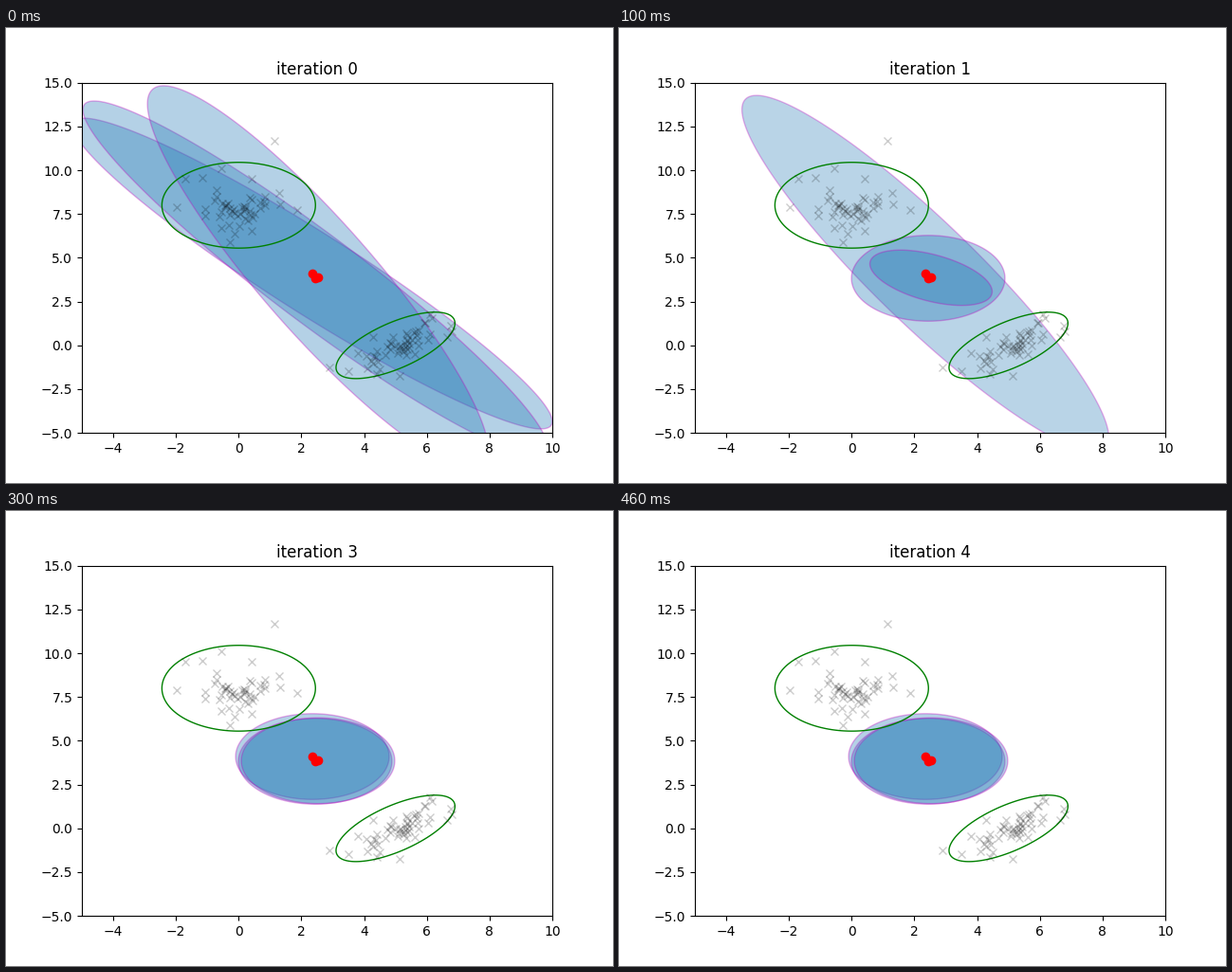
These frames come from a looping animation (640x480 px, 500 ms). A matplotlib script:

```python
import numpy as np
import matplotlib.pyplot as plt
from matplotlib.animation import FuncAnimation
from matplotlib.patches import Polygon

plt.rcParams["text.kerning_factor"] = 6  # whole-pixel kerning

K95 = np.sqrt(5.991)  # radius of the 95% contour
MEANS = [(2.35, 4.10), (2.44, 3.83), (2.53, 3.86)]
UNIT = (K95, K95, 0)

# Half width, half height and correlation of each component
SHAPES = [
    [(7.65, 8.87, -0.952), (7.41, 10.12, -0.951), (5.44, 10.96, -0.905)],
    [(5.85, 10.17, -0.92), UNIT, (1.95, 1.58, -0.5)],
    [UNIT] * 3,
]
LEAD_WEIGHTS = [1 / 3, 0.31, 1 / 3]

rng = np.random.default_rng(7)


def cluster(mean, sd, rho, n, strays):
    """Correlated normal core plus a few marks that stand apart."""
    sx, sy = sd
    cov = [[sx * sx, rho * sx * sy], [rho * sx * sy, sy * sy]]
    return np.vstack([rng.multivariate_normal(mean, cov, n), strays])


def contour(mean, shape):
    t = np.linspace(0, 2 * np.pi, 240, endpoint=False)
    w, h, rho = shape
    x = mean[0] + w * np.cos(t)
    y = mean[1] + h * (rho * np.cos(t) + np.sqrt(1 - rho ** 2) * np.sin(t))
    return np.column_stack([x, y])


fig, ax = plt.subplots(figsize=(6.4, 4.8), dpi=100)
ax.set_xlim(-5, 10)
ax.set_ylim(-5, 15)
title = ax.set_title("iteration 0")

upper = cluster((-0.15, 7.7), (0.65, 0.65), 0.1, 44,
                [(1.14, 11.68), (1.87, 7.73), (-1.7, 9.52), (-1.15, 9.57),
                 (-0.55, 10.1), (0.42, 9.52), (-1.97, 7.89), (-0.27, 5.89)])
lower = cluster((5.0, -0.05), (0.7, 0.7), 0.7, 48,
                [(2.9, -1.25), (3.5, -1.48), (6.1, 1.77), (6.75, 1.13),
                 (6.78, 0.8), (5.13, -1.75), (4.4, -1.64)])
ax.plot(*np.vstack([upper, lower]).T, "kx", alpha=0.2)

clouds = [ax.add_patch(Polygon(contour(mean, UNIT), fc="tab:blue", ec="m", lw=1))
          for mean in MEANS]

side = K95 * np.sqrt(0.6)
for mean, shape in [((0, 8), UNIT), ((5, 0), (side, side, 2 / 3))]:
    ax.add_patch(Polygon(contour(mean, shape), fill=False, ec="green", lw=1))

ax.plot(*np.transpose(MEANS), "ro")


def draw(i):
    title.set_text(f"iteration {i}")
    step = min(i, len(SHAPES) - 1)  # settled after the second update
    lead = LEAD_WEIGHTS[step]
    weights = [lead, (1 - lead) / 2, (1 - lead) / 2]
    for cloud, mean, shape, weight in zip(clouds, MEANS, SHAPES[step], weights):
        cloud.set_xy(contour(mean, shape))
        cloud.set_alpha(weight)
    return [title, *clouds]


anim = FuncAnimation(fig, draw, frames=5, interval=100, repeat=True,
                     repeat_delay=0, blit=False)
plt.show()
```
